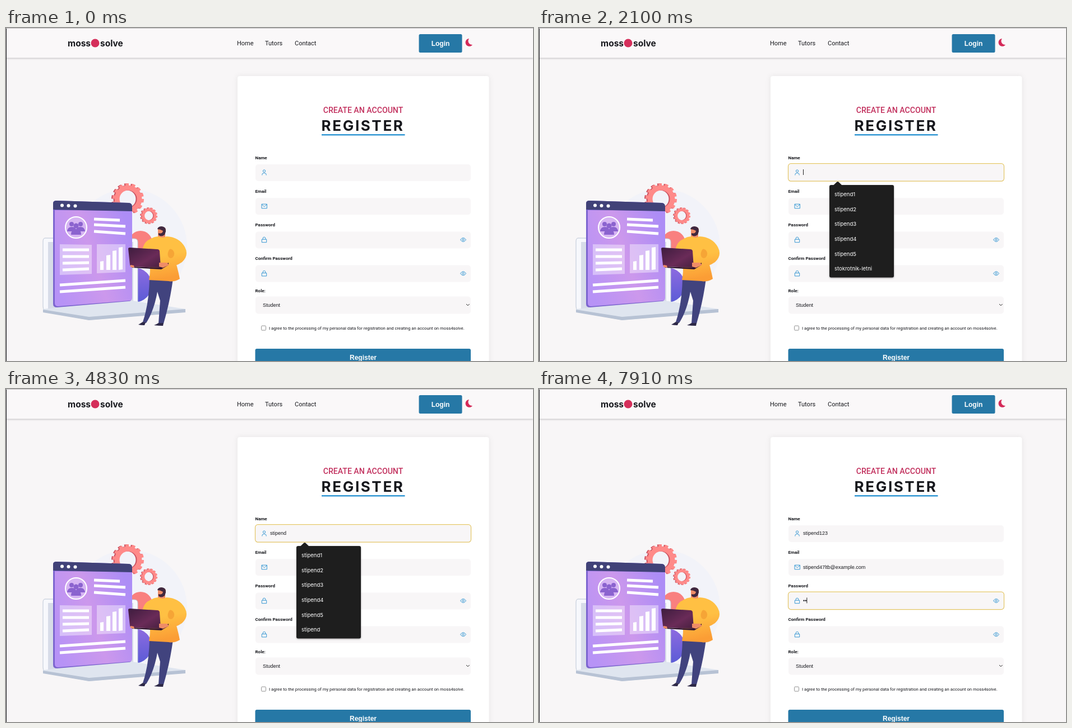
Write an HTML page that moves like this. It is 940 by 596 pixels and loops after 8 s.

```html
<!DOCTYPE html>
<html lang="en">
<head>
<meta charset="utf-8">
<title>Register form</title>
<style>
  html, body { margin: 0; width: 100%; height: 100%; overflow: hidden; background: #f8f6f7; }
  svg { display: block; }
  text { font-family: Roboto, sans-serif; fill: #17181d; white-space: pre; }
  .arial { font-family: "Liberation Sans", Arial, sans-serif; font-size: 9px; }
  .nav { font-size: 11px; }
  .brand { font: 700 15.5px Inter, sans-serif; }
  .label { font-size: 8px; font-weight: 700; }
  .button { font-size: 12px; font-weight: 700; fill: #fff; text-anchor: middle; }
  .item { font: 9.5px Inter, sans-serif; fill: #fff; }
  .icon { fill: none; stroke: #3597d3; stroke-width: 1; stroke-linejoin: round; }
  .white { fill: none; stroke: #fff; stroke-width: 5.2; }
</style>
</head>
<body>
<svg width="940" height="596" viewBox="0 0 940 596">
  <defs>
    <linearGradient id="pane" x1="0" y1=".7" x2="1" y2=".3">
      <stop offset="0" stop-color="#b793f6"/><stop offset=".5" stop-color="#cc98ec"/><stop offset="1" stop-color="#ad8df6"/>
    </linearGradient>
    <linearGradient id="shirt" x1="0" y1="0" x2=".2" y2="1">
      <stop offset=".5" stop-color="#ffc043"/><stop offset="1" stop-color="#fb9d35"/>
    </linearGradient>
    <linearGradient id="lid" x1="0" y1="0" x2="1" y2="1">
      <stop offset="0" stop-color="#3d1c3e"/><stop offset=".6" stop-color="#6a2b58"/><stop offset="1" stop-color="#47203f"/>
    </linearGradient>
    <linearGradient id="ball" x1="0" y1="0" x2="0" y2="1">
      <stop offset="0" stop-color="#8d6be0"/><stop offset="1" stop-color="#5b5bd6"/>
    </linearGradient>
    <filter id="soft" x="-10%" y="-10%" width="120%" height="120%"><feGaussianBlur stdDeviation="5"/></filter>
    <filter id="thin" x="-5%" y="-30%" width="110%" height="160%"><feGaussianBlur stdDeviation="1.4"/></filter>
    <g id="gear" fill="none">
      <circle r="20" stroke-width="9"/>
      <circle r="25.5" stroke-width="5" stroke-dasharray="6 5.44"/>
    </g>
    <path id="lock" class="icon" d="M-4.2-.8h8.4v5.5h-8.4zM-2.3-.8v-1.7a2.3 2.3 0 0 1 4.6 0v1.7"/>
    <g id="eye" class="icon"><path d="M-5 0Q0-7 5 0Q0 7-5 0z"/><circle r="1.6"/></g>
  </defs>

  <rect width="940" height="596" fill="#f8f6f7"/>

  <!-- illustration -->
  <circle cx="220" cy="391" r="103" fill="#f2f3f9"/>
  <g transform="translate(216 306)">
    <use href="#gear" stroke="#c9505f"/><use href="#gear" x="2" stroke="#ff8a89"/>
  </g>
  <g transform="translate(254 336) scale(.53)">
    <use href="#gear" stroke="#c9505f"/><use href="#gear" x="2.5" stroke="#ff8a89"/>
  </g>
  <circle cx="240" cy="384" r="21" fill="#f9807f"/>
  <circle cx="229" cy="460" r="31" fill="url(#ball)"/>
  <path d="M70 376L229 377Q235 377 235 383V494L72 508Q66 505 66 498V382Q66 376 70 376z" fill="#f7f8fc" stroke="#bcc6d6"/>
  <path d="M75 383h152v108l-152 12z" fill="#d7dce8"/>
  <path d="M66 503L225 488L320 503V508L148 523L66 507z" fill="#dfe5ef"/>
  <path d="M66 504L148 517L320 503V509L148 523L66 509z" fill="#b7c2d4"/>
  <path d="M84 314Q84 309 90 309L219 313Q224 313 224 318V484Q224 489 219 489L91 500Q84 500 84 494z" fill="#7c65cf"/>
  <path d="M87 326L225 327V483Q225 488 220 488L93 498Q87 498 87 492z" fill="url(#pane)"/>
  <path d="M84 325V314Q84 309 90 309L219 313Q225 314 225 319V328z" fill="#414278"/>
  <g fill="#fff"><circle cx="100" cy="317.5" r="3"/><circle cx="111.5" cy="318" r="3"/><circle cx="123.5" cy="318.5" r="3"/></g>
  <circle cx="125" cy="357" r="19" fill="#d6b4f3" stroke="#fff" stroke-width="2"/>
  <g fill="#8b63cf">
    <circle cx="117" cy="351" r="4"/><circle cx="133" cy="351" r="4"/><circle cx="125" cy="354" r="4.6"/>
    <path d="M109 364q1-8 8-8t8 5q1-5 8-5t8 8zM116 370q0-10 9-10t9 10z"/>
  </g>
  <g fill="#fff" opacity=".4"><path d="M96 387l57 1v52l-57 2zM162 387h51v50l-51 2z"/></g>
  <path class="white" d="M157 342l46 2M157 352l56 3M157 364l56 4M101 397h47M101 409h47M101 421l47-1M101 433l47-2M96 460l117-8M96 472l117-8"/>
  <path d="M168 433v-15l6-1v16zM179 433v-26l7-1v27zM190 433v-34l7-1v35zM201 433v-40l7-1v40z" fill="#fff"/>

  <path d="M256 448H298Q293 488 281 529H272L275 488L270 472Q264 506 250 528L244 526Q255 494 256 448z" fill="#41437e"/>
  <path d="M236 531q5-3 8-5l5 1-2 5q-6 0-11-1zM264 532q5-2 8-4h9l-1 5q-8 0-16-1z" fill="#2d2847"/>
  <path d="M271 364h13v13q-6 4-13 0z" fill="#ef8c67"/>
  <path d="M255 379Q264 373 272 373Q279 377 286 373Q309 374 319 392Q327 407 314 419Q303 427 285 429L281 419Q290 417 293 412Q287 409 288 400Q290 394 296 395Q303 401 300 411Q306 428 310 449Q300 455 290 453L255 451Q259 429 255 423Q240 419 241 405Q245 383 255 379z" fill="url(#shirt)"/>
  <path d="M290 399q2-6 7-2q6 6 1 13q-4 4-8 0q-3-5 0-11z" fill="#f6a536"/>
  <path d="M271 361q-1-5 7-5q8 0 7 7l-2 7q-9 4-12-2z" fill="#ef8c67"/>
  <path d="M270 360q1-5 8-5q8 1 7 9l-2 6q-7 5-11 0v-3q7 2 8-4q-5-3-10-3z" fill="#40283f"/>
  <path d="M218 395Q218 393 221 393L270 396Q273 396 274 399L276 429L225 427Q222 427 221 424z" fill="url(#lid)"/>
  <path d="M224 427L274 429L290 420V424L277 432L225 429z" fill="#32172f"/>
  <path d="M273 420l14 0 4 4-11 5-7-2zM222 424l6 1 1 4-7-1z" fill="#ef8c67"/>

  <!-- header -->
  <rect y="1" width="940" height="53.5" fill="#8a888a" filter="url(#thin)" opacity=".55"/>
  <rect width="940" height="53.5" fill="#faf8f9"/>
  <text class="brand" x="110" y="32.5">moss</text>
  <circle cx="159" cy="27" r="7.5" fill="#d52f5b"/>
  <text class="brand" x="168" y="32.5">solve</text>
  <text class="nav" x="412" y="31">Home</text>
  <text class="nav" x="462" y="31">Tutors</text>
  <text class="nav" x="515" y="31">Contact</text>
  <rect x="736.5" y="11" width="77" height="33" rx="2.5" fill="#2678a6"/>
  <text class="arial button" x="775" y="31.5">Login</text>
  <path d="M826 19A6.9 6.9 0 1 0 832 30Q827 30 825 26Q823.5 22 826 19z" fill="#d42a58"/>

  <!-- form -->
  <rect x="413" y="86" width="448.5" height="540" rx="4" fill="#777" opacity=".14" filter="url(#soft)"/>
  <rect x="413" y="86" width="448.5" height="540" rx="4" fill="#fff"/>
  <text x="637" y="152" text-anchor="middle" font-size="14.1" font-weight="500" style="fill:#c2315e">CREATE AN ACCOUNT</text>
  <text x="562.5" y="183.5" style="font:700 26px Inter,sans-serif;letter-spacing:2.67px">REGISTER</text>
  <rect x="563" y="190" width="148.5" height="2.4" fill="#2c94d2"/>
  <g id="fields"></g>
  <path class="icon" d="M456.8 263.5v-.8q0-3 2.6-3h2.2q2.6 0 2.6 3v.8"/>
  <circle class="icon" cx="460.5" cy="256" r="2.1"/>
  <path class="icon" d="M456 315.2h9.4v7.6h-9.4zM456 315.8l4.7 3.8 4.7-3.8"/>
  <use href="#lock" x="460.5" y="379"/><use href="#lock" x="460.5" y="439.3"/>
  <use href="#eye" x="815.5" y="379"/><use href="#eye" x="815.5" y="439.3"/>
  <text class="label" x="444.5" y="472.5">Role:</text>
  <rect x="445" y="480.5" width="384" height="31" rx="5" fill="#f8f6f7"/>
  <text class="arial" x="458" y="499">Student</text>
  <path d="M821 494l2.8 2.8 2.8-2.8" fill="none" stroke="#222"/>
  <rect x="455.5" y="533" width="8" height="8" rx="1.5" fill="#fff" stroke="#767676" stroke-width=".8"/>
  <text x="469" y="540" font-size="7.74">I agree to the processing of my personal data for registration and creating an account on moss4solve.</text>
  <rect x="444.5" y="574" width="384.5" height="40" rx="3" fill="#2678a6"/>
  <text class="arial button" x="637" y="594">Register</text>

  <rect id="ring" x="444.5" width="385" height="31.5" rx="5" fill="none" stroke="#e3c566" stroke-width="1.2"/>
  <rect id="caret" width="1" height="10" fill="#222"/>
  <g id="list">
    <rect id="shade" x="518" y="282" width="115" rx="3" fill="#000" opacity=".35" filter="url(#thin)"/>
    <path d="M524.5 282L531 275.8Q532.8 274.4 534.6 275.8L541 282z" fill="#1e1e1e"/>
    <rect id="panel" x="518" y="281" width="115" rx="3" fill="#1e1e1e"/>
  </g>
  <rect width="1" height="596" fill="#17171b"/>
  <rect width="940" height="1" fill="#c4c2c4"/>
</svg>
<script>
const $ = id => document.getElementById(id);
const add = (parent, tag, attrs, text = '') => {
  const el = document.createElementNS('http://www.w3.org/2000/svg', tag);
  for (const key in attrs) el.setAttribute(key, attrs[key]);
  el.textContent = text;
  return parent.appendChild(el);
};
const show = (el, on) => el.setAttribute('visibility', on ? 'visible' : 'hidden');

const rowY = i => 244 + i * 60.2;
const inputs = ['Name', 'Email', 'Password', 'Confirm Password'].map((name, i) => {
  const y = rowY(i);
  add($('fields'), 'text', { class: 'label', x: 444.5, y: y - 9.5 }, name);
  add($('fields'), 'rect', { x: 445, y, width: 384, height: 30, rx: 5, fill: '#f8f6f7' });
  return add($('fields'), 'text', { class: 'arial', x: 471, y: y + 17.3 });
});
const items = [1, 2, 3, 4, 5, ''].map((n, i) =>
  add($('list'), 'text', { class: 'item', x: 527, y: 301 + i * 26.65 }, 'stipend' + n));

// [ms, field, text, caret, last suggestion]; no suggestion hides the list, '' leaves one item
const wide = 'stokrotnik-letni', mid = 'stokrotnik', base = 'stipend';
const steps = [
  [0, -1, '', 0],
  [1960, 0, '', 1],
  [2030, 0, '', 1, wide],
  [2450, 0, '', 0, wide],
  [2590, 0, 's', 1, base],
  [2870, 0, 'st', 1, mid],
  [3010, 0, 'sty', 1, mid],
  [3080, 0, 'sty', 1],
  [3430, 0, 'st', 1, mid],
  [3710, 0, 'sti', 1, mid],
  [3990, 0, 'stip', 1, mid],
  [4060, 0, 'stipe', 1, mid],
  [4130, 0, 'stipen', 1, mid],
  [4270, 0, base, 1, base],
  [4830, 0, base, 0, base],
  [5180, 0, base + '1', 1, ''],
  [5250, 0, base + '12', 1],
  [5320, 0, base + '123', 1],
  [5600, 1, '', 1],
  [6160, 1, base + '47ltb@example.com', 1],
  [6580, 2, '', 1],
  [7070, 2, '', 0],
  [7630, 2, '•', 1],
  [7910, 2, '••', 1]
];

function draw(t) {
  const values = ['', '', '', ''];
  let now;
  for (const step of steps) {
    if (step[0] > t) break;
    now = step;
    if (step[1] >= 0) values[step[1]] = step[2];
  }
  const [, field, , caret, last] = now;
  inputs.forEach((el, i) => el.textContent = values[i]);

  show($('ring'), field >= 0);
  show($('caret'), caret);
  if (field >= 0) {
    $('ring').setAttribute('y', rowY(field) - 1.3);
    $('caret').setAttribute('x', 471 + inputs[field].getComputedTextLength());
    $('caret').setAttribute('y', rowY(field) + 9);
  }

  const open = last !== undefined;
  show($('list'), open);
  items.forEach((el, i) => show(el, open && (last || !i)));
  items[5].textContent = last || '';
  for (const id of ['shade', 'panel']) $(id).setAttribute('height', last ? 165.5 : 33);
}

function tick() {
  draw(performance.now() % 8000);
  requestAnimationFrame(tick);
}
tick();
</script>
</body>
</html>
```
